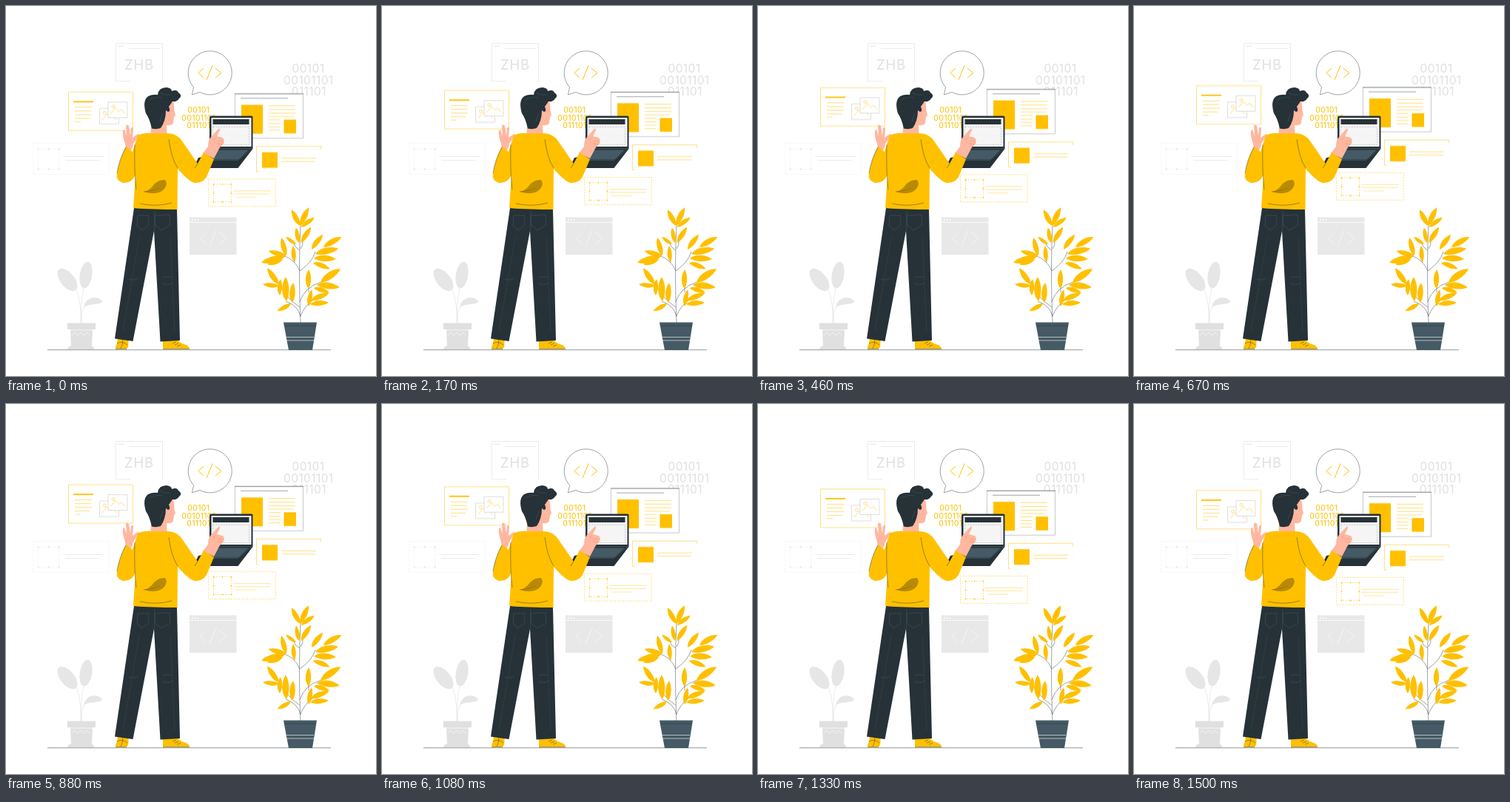
Write an HTML page without scripts that moves like this. It is 500x500 px and loops after 1540 ms.

```html
<!DOCTYPE html>
<html lang="en">
<head>
<meta charset="utf-8">
<title>Developer at work</title>
<style>
  html, body { margin: 0; width: 100%; height: 100%; overflow: hidden; background: #fff; }
  svg { display: block; width: 100vw; height: 100vh; fill: none; }
  .float { animation: float 1540ms linear -50ms infinite; }
  @keyframes float { 50% { transform: translateY(-10px); } }
  .yellow { fill: #ffc000; }
  .dark { fill: #263238; }
  .skin { fill: #ffb79f; }
  .gray { fill: #e0e0e0; }
  .pale { fill: #e6e6e6; }
  .card { fill: #fff; }
  .line-y { stroke: #ffc000; stroke-width: .5; }
  .line-d { stroke: #263238; stroke-width: .45; }
  .line-g { stroke: #e0e0e0; stroke-width: .6; }
  .fold { stroke: #455a64; stroke-width: .5; }
  .dash { stroke-dasharray: 2 1.6; }
  text { font-family: Inter, sans-serif; font-weight: 400; text-anchor: middle; }
  .bits { font-size: 15.5px; letter-spacing: .4px; }
  .small { font-size: 10.7px; letter-spacing: .2px; }
  .title { font-size: 18.5px; letter-spacing: .8px; }
</style>
</head>
<body>
<svg viewBox="0 0 500 500">
  <defs>
    <path id="code" d="M-8-6.5l-7 6.5 7 6.5M4-10l-8 19.5M8-6.5l8 6.5-8 6.5"/>
    <path id="leaf" d="M0 0C.25-.22.7-.2 1 0C.75.16.25.16 0 0"/>
    <g id="picture">
      <path class="card" stroke="#b5b5b5" stroke-width=".45" d="M0 0h26v21H0z"/>
      <path class="line-y" d="M3 16l7-8 5 5 3-3 5 6"/>
      <circle class="line-y" cx="7" cy="6" r="2"/>
    </g>
  </defs>

  <!-- Background windows -->
  <g class="line-g">
    <path d="M168 101.500H148.500V50.500H211.500V102M166 57.500H208"/>
    <path stroke-width="1.300" stroke-dasharray="1.500 1.200" d="M152 54.500h8"/>
    <path class="dash" stroke="#ececec" d="M36.500 185.500h103v42h-103zM43.500 193.500h28v27h-28z"/>
    <path d="M77 203.500h55M80 208.500h46"/>
    <path stroke-width="1.800" stroke-dasharray="1.500 12.500" d="M43 193.500h30M43 220.500h30"/>
  </g>
  <text class="title gray" x="180" y="85.500">ZHB</text>
  <g class="bits gray">
    <text x="408.500" y="90.300">00101</text>
    <text x="408.800" y="105.700">00101101</text>
    <text x="409.300" y="121.300">011101</text>
  </g>
  <path fill="#e8e8e8" d="M248 285.500h63.500v50.500H248z"/>
  <path stroke="#fff" stroke-width=".8" d="M248 292.500h63.500"/>
  <path stroke="#fff" stroke-width="1.500" stroke-dasharray="2 1.800" d="M251 289.300h11"/>
  <use href="#code" transform="translate(279.500 314)scale(1.150)" stroke="#f8f8f8" stroke-width=".7"/>
  <path class="card line-d" d="M253.500 109.800A29.500 29.500 0 1 1 262 116.500L251.500 119.800z"/>
  <use href="#code" x="275" y="90.500" stroke="#ffc000"/>
  <g class="small yellow">
    <text x="260.300" y="144">00101</text>
    <text x="260.300" y="154.500">00101101</text>
    <text x="260.300" y="165">011101</text>
  </g>

  <!-- Floating cards -->
  <g class="float">
    <g class="line-y">
      <path class="card" d="M84.500 117h87v52h-87z"/>
      <path stroke-width="1.800" d="M91 130h27"/>
      <path d="M93 137.500h23M93 142.500h22M93 147.500h23M93 152.500h20M93 157h8"/>
      <use href="#picture" x="126.500" y="139"/>
      <use href="#picture" x="138" y="130.500"/>
    </g>
    <path class="card" stroke="#909090" stroke-width=".5" d="M309.500 119.300h92v60h-92z"/>
    <path class="line-d" stroke-width=".6" d="M309 119.300h93M317 125.300h64"/>
    <path class="yellow" d="M318 134.300h29v39h-29zM375.500 154.300h16.500v18.500h-16.500z"/>
    <path class="line-y" d="M355 135.500h36M355 140.500h36M355 145.500h36M355 150h34M355 154.500h16M355 159.500h16M355 164h16M355 168.500h15"/>
    <g class="line-y">
      <path class="card" stroke="none" d="M338.500 190.300h87v34h-87z"/>
      <path d="M342 224.300h-3.500v-34h87v4"/>
      <path class="yellow" stroke="none" d="M346 198.300h21v21h-21z"/>
      <path d="M372 206.300h47M372 210.800h46"/>
      <path class="card dash" d="M273.500 234.500h91v37h-91z"/>
      <path class="dash" d="M280.500 241.500h24v24h-24z"/>
      <path stroke-width="1.600" stroke-dasharray="1.600 10.400" d="M279.700 241.500h26M279.700 265.500h26M280.500 252.700v1.600M304.500 252.700v1.600"/>
      <path stroke-width=".4" d="M307 250.500h51M307 254.700h50M310 259.200h28"/>
    </g>
  </g>

  <path stroke="#8a9094" stroke-width=".9" d="M56 464.700H439"/>

  <!-- Pale plant -->
  <g class="pale">
    <ellipse cx="83" cy="370" rx="9.500" ry="18" transform="rotate(-39 83 370)"/>
    <ellipse cx="108" cy="363.500" rx="8.300" ry="18" transform="rotate(9 108 363.500)"/>
    <path d="M105 407C108 392 124 391 130 399C128 405 114 401 105 407z"/>
    <path class="line-g" fill="none" d="M95 383Q102 400 101 429M105 381Q100 405 102 429M106 406Q101 415 102 429"/>
    <path class="gray" d="M83 428.500h38v8.500H83zM87 437h30l-1 22H88zM83 464q1-5 7-5h23q6 0 6 5z"/>
    <path stroke="#f5f5f5" fill="none" d="M87 438h30M89 445l4-4 4 4 4-4 4 4 4-4 4 4"/>
  </g>

  <!-- Yellow plant -->
  <path class="line-d" stroke-width=".6" d="M398 428Q395 360 398 295M398 328Q402 323 401 317M397 330Q390 326 389 321M397 358Q390 341 373 337M397 358Q414 346 418 332M390 346V341M397 407Q380 396 368 374M398 420Q395 405 378 399M397 400Q403 380 426 373M409 381V387M398 419Q403 406 414 398"/>
  <g class="yellow">
    <use href="#leaf" transform="translate(398 297)rotate(-119)scale(25)"/>
    <use href="#leaf" transform="translate(398 297)rotate(-66)scale(27)"/>
    <use href="#leaf" transform="translate(399 299)rotate(-36)scale(22)"/>
    <use href="#leaf" transform="translate(396 320)rotate(-101)scale(21)"/>
    <use href="#leaf" transform="translate(399 320)rotate(-58)scale(25)"/>
    <use href="#leaf" transform="translate(392 322)rotate(-144)scale(17)"/>
    <use href="#leaf" transform="translate(379 337)rotate(-106)scale(25)"/>
    <use href="#leaf" transform="translate(390 346)rotate(-95)scale(22)"/>
    <use href="#leaf" transform="translate(379 337)rotate(-166)scale(25)"/>
    <use href="#leaf" transform="translate(377 338)rotate(165)scale(33)"/>
    <use href="#leaf" transform="translate(374 342)rotate(160)scale(22)"/>
    <use href="#leaf" transform="translate(413 329)rotate(-53)scale(25)"/>
    <use href="#leaf" transform="translate(429 326)rotate(-30)scale(28)"/>
    <use href="#leaf" transform="translate(418 335)rotate(-13)scale(32)"/>
    <use href="#leaf" transform="translate(416 341)rotate(2)scale(30)"/>
    <use href="#leaf" transform="translate(415 347)rotate(20)scale(24)"/>
    <use href="#leaf" transform="translate(409 382)rotate(-90)scale(26)"/>
    <use href="#leaf" transform="translate(425 374)rotate(-35)scale(33)"/>
    <use href="#leaf" transform="translate(420 377)rotate(6)scale(31)"/>
    <use href="#leaf" transform="translate(416 381)rotate(17)scale(22)"/>
    <use href="#leaf" transform="translate(369 376)rotate(-126)scale(27)"/>
    <use href="#leaf" transform="translate(369 378)rotate(-175)scale(22)"/>
    <use href="#leaf" transform="translate(370 391)rotate(-88)scale(22)"/>
    <use href="#leaf" transform="translate(379 399)rotate(-92)scale(33)"/>
    <use href="#leaf" transform="translate(387 401)rotate(-88)scale(27)"/>
    <use href="#leaf" transform="translate(385 402)rotate(151)scale(21)"/>
    <use href="#leaf" transform="translate(409 406)rotate(-80)scale(23)"/>
    <use href="#leaf" transform="translate(412 398)rotate(-22)scale(26)"/>
    <use href="#leaf" transform="translate(411 403)rotate(-5)scale(25)"/>
  </g>
  <path fill="#455a64" d="M375 427.500h45l-6 37.500h-32z"/>
  <path stroke="#cfd8dc" stroke-width=".8" d="M379 447.500h37M380 452h36"/>
  <path class="line-d" d="M376 432h43"/>

  <!-- Laptop -->
  <path class="dark" d="M277 148.500h55q1.500 0 1.500 2V193l-20 26H272l-16-6 4-8 15-3V150.500q0-2 2-2z"/>
  <path fill="#f5f5f5" d="M277.500 151h54v39h-54z"/>
  <path class="dark" d="M279.500 153h49v7h-49z"/>
  <path class="dash" stroke="#b0b0b0" stroke-width=".6" d="M279.500 163.500h49v24h-49z"/>
  <path fill="#455a64" d="M281 194.500h47l-14 13h-44z"/>
  <path stroke="#455a64" stroke-width=".7" d="M276 192.500h57M274 208.500h39l19-15"/>

  <!-- Shoes and trousers -->
  <path class="yellow" d="M151 448h15l-1 13-2 2.500h-15q0-4 2-8zM212 451h19q5 5 12 7 5 2 5 5.500h-36z"/>
  <path class="line-d" d="M148 463.500h15M212 463.500h36M150 456q7-4 14 2M158 451q0 6-3 12M225 456l5-2M228 458l5-2M231 460l5-2"/>
  <path class="dark" d="M173 273L231 274.500 235 452 208.500 453.500 200 304 171.500 453 147 449.500z"/>
  <path class="fold" d="M201 277L200.500 304M178 283l-1 14 7 6 8-6 1-14zM201 283l1 14 8 6 12-7-1-14zM166 369q9 3 13-2M212 367q9-3 13 1M211 375q8 3 14-1"/>
  <path class="fold dash" d="M180 313L158 440M222 315l6 125"/>

  <!-- Hands, head -->
  <path class="skin" d="M162 196L161 186Q157 176 158 168l2-1 3 9-1-14q2-3 4 0l2 13 1-10q3-3 3 1l-1 12 7-5q3 0 1 3l-7 10q-1 7-5 11z"/>
  <path class="skin" d="M266 199L273 190Q273 180 278 176L287 166q3-1 2 2l-4 8 8 2q3 4 1 8l-5 5-8 15z"/>
  <path stroke="#e58f7e" stroke-width=".5" d="M284 177l-4 4M286 182l7 1M285 186l7 1"/>
  <path class="skin" d="M196 158L215 140 218 130h8.500q1 7 1 12l1.500 6-2 2-1 8q-2 4-9 3l.5 12h-22z"/>
  <path class="dark" d="M197 165.500Q194 152 189 145Q184 128 192 122Q198 119 205 120Q206 110 217 110Q224 111 224 115Q231 112 233 117Q239 121 234 125Q231 130 225 129L220 136Q223 143 219 143L216 141Q216 155 209 165Q203 167 197 165.500z"/>
  <path class="fold" d="M193 127q8-5 18-3M208 117q5 4 14 3M212 145l-4 11"/>

  <!-- Shirt -->
  <path class="yellow" d="M178 175Q186 171 196 172H218Q232 172 239 184L259 213 267 198 281 207 271 231Q265 240 255 239Q248 238 232 220L231.500 275Q200 275 172 273L175 228Q170 240 158 239Q148 236 150 226Q153 207 162 190L171 197z"/>
  <path class="line-d" d="M174 187Q173 225 176 248M150 226Q153 207 162 191M220 180Q223 205 232 219M181 267Q203 272 224 266M259 213l-4 6"/>
  <path fill="#b98b00" d="M186 251Q195 249 200 241Q207 234 215 235Q219 240 214 247Q205 257 186 251z"/>
  <path stroke="#806000" stroke-width=".5" d="M186 251q11 0 21-5"/>
</svg>
</body>
</html>
```
